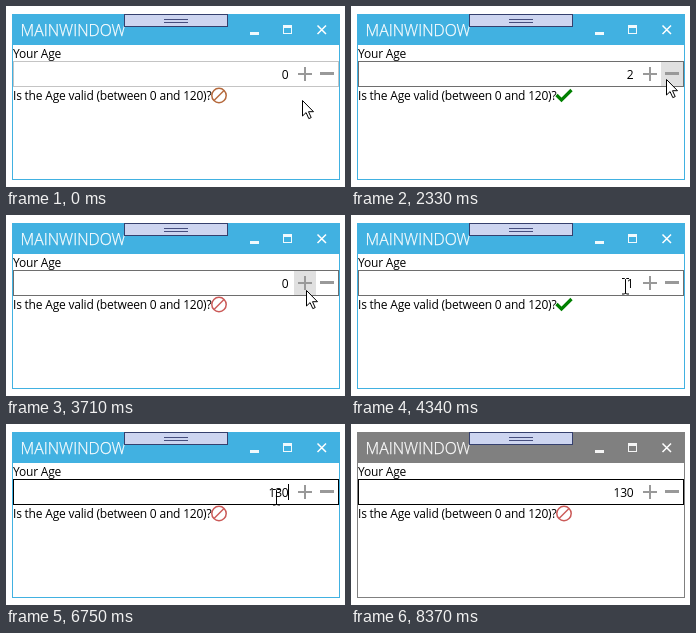
An HTML page that plays this animation: 339x181 px, repeating every 8.45 s.

```html
<!DOCTYPE html>
<html lang="en">
<head>
<meta charset="utf-8">
<title>Numeric input</title>
<style>
  html, body { margin: 0; width: 100%; height: 100%; overflow: hidden; background: #fff; }
  svg { display: block; width: 339px; height: 181px; }
  text { font: 12px "Open Sans", "Noto Sans", sans-serif; letter-spacing: -.2px; white-space: pre; }
  rect { shape-rendering: crispEdges; }
  #win { --theme: #41b1e1; }
  #win.inactive { --theme: #808080; }
  .bar { fill: var(--theme); }
  .frame { fill: #fff; stroke: var(--theme); }
  .title { font-size: 15.8px; font-weight: 300; letter-spacing: 0; fill: #fff; stroke: #fff; stroke-width: .25px; }
  .field { fill: #fff; stroke: #c4c4c4; }
  .field.hover { stroke: #6e6e6e; }
  .field.focus { stroke: #000; }
  .btn { fill: #fff; color: #999; }
  .btn.hover { fill: #e0e0e0; }
  .btn.press { fill: #000; color: #fff; }
  .btn path { fill: currentColor; shape-rendering: crispEdges; }
  [hidden] { display: none; }
</style>
</head>
<body>
<svg viewBox="0 0 339 181">
  <g id="win">
    <rect class="frame" x="6.5" y="8.5" width="327" height="165"/>
    <rect class="bar" x="6" y="8" width="328" height="31"/>
    <text class="title" x="14.6" y="30">MAINWINDOW</text>
    <g fill="#fff" fill-opacity=".92">
      <rect x="244" y="26" width="9" height="3"/>
      <path d="M277 19h9v9h-9zm1 3v5h7v-5z" fill-rule="evenodd"/>
    </g>
    <path d="M311.500 19.500l8.500 8.500m0-8.500l-8.500 8.500" stroke="#fff" stroke-width="1.5"/>
    <rect x="118.5" y="8.5" width="103" height="12" fill="#cdd5f0" stroke="#35406e"/>
    <path d="M158 13.500h24m-24 3h24" stroke="#454d7d"/>
  </g>

  <text x="7" y="52">Your Age</text>
  <rect id="field" class="field" x="7.5" y="55.5" width="325" height="25"/>
  <rect id="sel" x="275" y="60" width="7" height="16" fill="#93bfca"/>
  <text id="value" x="282.5" y="73" text-anchor="end">0</text>
  <rect id="caret" x="282" y="60" width="1" height="16"/>
  <g id="plus" class="btn">
    <rect x="288" y="56" width="22" height="24"/>
    <path d="M292 67h6v-6h2v6h6v2h-6v6h-2v-6h-6z"/>
  </g>
  <g id="minus" class="btn">
    <rect x="310" y="56" width="22" height="24"/>
    <path d="M314 66h14v3h-14z"/>
  </g>

  <text x="7" y="94">Is the Age valid (between 0 and 120)?</text>
  <g id="bad" fill="none" stroke-width="1.5">
    <circle cx="213" cy="89.5" r="7.2"/>
    <path d="M208 94.500l10-10"/>
  </g>
  <path id="good" d="M205.500 89l5 5 10-10" fill="none" stroke="#008000" stroke-width="3.2"/>

  <g id="pointer">
    <circle id="halo" r="12" fill="#e6dc00" fill-opacity=".58"/>
    <path id="arrow" d="M.5.5v15.500l3.600-3.400 2.700 6 2.400-1-2.700-5.900h5z" fill="#fff" stroke="#000"/>
    <path id="beam" d="M-3-7.500h2.500l1 1 1-1h2.500M.5-6.500v14M-3 8h2.500l1-1 1 1h2.500" fill="none" stroke="#000"/>
  </g>
</svg>
<script>
const LOOP = 8450, GLIDE = 230, PRESS = 150;
const FOCUS = 4490, TYPE = 5650, KEY = 160, BLINK = 545, BLUR = 8290;
const $ = Object.fromEntries([...document.querySelectorAll('[id]')].map(e => [e.id, e]));

// Pointer stops: arrival time, x, y
const stops = [
  [150, 297, 92], [930, 298, 74], [2340, 315, 73], [3410, 300, 75],
  [4340, 271, 72], [FOCUS, 283, 70], [6750, 270, 73], [7370, 249, 160]
];
const clicks = [1540, 2010, 2410, 2640, 2950, 3560, 3790, FOCUS];

const show = (el, on) => el.toggleAttribute('hidden', !on);

function pointerAt(t) {
  let x = 296, y = 95;
  for (const [arrive, tx, ty] of stops) {
    const k = Math.max(0, Math.min(1, 1 - (arrive - t) / GLIDE));
    const ease = k * k * (3 - 2 * k);
    x += (tx - x) * ease;
    y += (ty - y) * ease;
  }
  return [Math.round(x), Math.round(y)];
}

// Typed digits, or one up or down for each click on a button
function valueAt(t) {
  if (t >= TYPE) return +'130'.slice(0, 1 + (t - TYPE) / KEY);
  return clicks.filter(c => c <= t).reduce((sum, c) => {
    const [x] = pointerAt(c);
    return sum + (x >= 310 ? -1 : x >= 288 ? 1 : 0);
  }, 0);
}

function draw(t) {
  const [x, y] = pointerAt(t);
  // Typing hides the pointer until it moves again
  const present = t < TYPE - 80 || (t >= 6750 && t < 7360);
  const over = present && y < 81;
  const beam = over && x < 288;
  const press = clicks.some(c => t >= c && t < c + PRESS);

  $.pointer.setAttribute('transform', `translate(${x} ${y})`);
  show($.pointer, present);
  show($.halo, press);
  show($.arrow, !beam);
  show($.beam, beam);

  const button = (el, hit) => el.setAttribute('class', 'btn' + (hit ? press ? ' press' : ' hover' : ''));
  button($.plus, over && x >= 288 && x < 310);
  button($.minus, over && x >= 310);
  $.field.setAttribute('class', 'field' + (t >= FOCUS ? ' focus' : over ? ' hover' : ''));

  const value = valueAt(t);
  const valid = value > 0 && value <= 120;
  $.value.textContent = value;
  show($.good, valid);
  show($.bad, !valid);
  $.bad.setAttribute('stroke', t < clicks[0] ? '#b5693c' : '#cb5a58');

  show($.sel, t >= FOCUS + 80 && t < TYPE);
  show($.caret, t >= TYPE && t < BLUR && Math.floor((t - TYPE) / BLINK) % 2 === 0);
  $.win.classList.toggle('inactive', t >= BLUR);
}

const begin = performance.now();
function tick() {
  draw((performance.now() - begin) % LOOP);
  requestAnimationFrame(tick);
}
draw(0);
requestAnimationFrame(tick);
</script>
</body>
</html>
```
